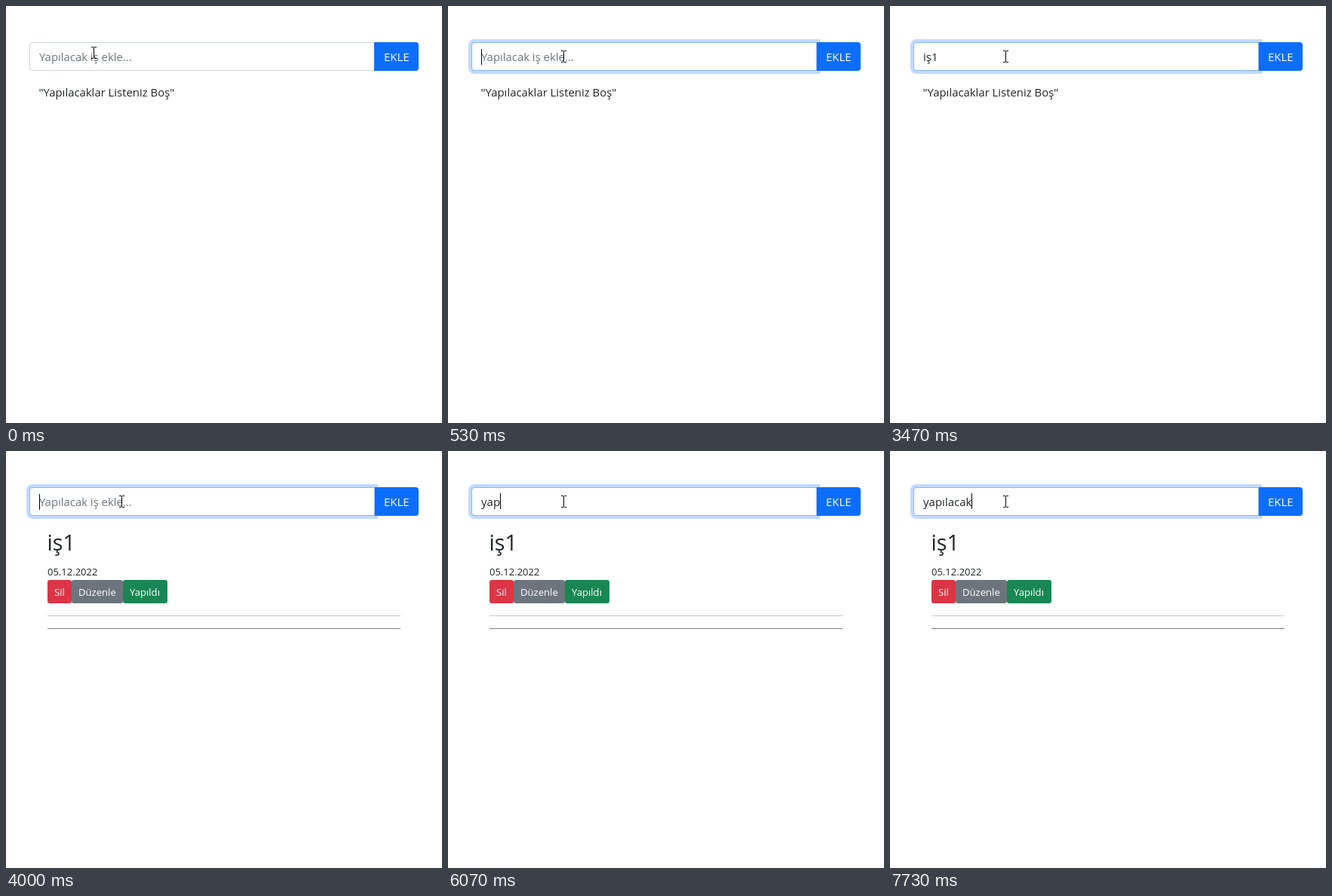
Write an HTML page that moves like this. It is 578x553 px and loops after 8000 ms.

```html
<!DOCTYPE html>
<html lang="tr">
<head>
<meta charset="utf-8">
<title>Yapılacaklar</title>
<style>
  html, body { margin: 0; width: 100%; height: 100%; overflow: hidden; background: #fff; }
  svg { display: block; width: 578px; height: 553px; }
  text { font: 15px "Open Sans", "Noto Sans", sans-serif; fill: #212529; white-space: pre; }
  .hint { fill: #6c757d; }
  .on { fill: #fff; }
  .tight { font-size: 14.9px; }
  .small { font-size: 13.1px; }
  .date { font-size: 13px; }
  .title { font-size: 28.75px; }
  .crisp { shape-rendering: crispEdges; }
</style>
</head>
<body>
<svg viewBox="0 0 578 553">
  <defs>
    <path id="field" d="M488.5 48.5H35a3.5 3.5 0 0 0-3.5 3.5V82a3.5 3.5 0 0 0 3.5 3.5H488.5z"/>
  </defs>
  <use href="#field" fill="#fff" stroke="#ced4da"/>
  <path fill="#0d6efd" d="M488 48H543a4 4 0 0 1 4 4V82a4 4 0 0 1-4 4H488z"/>
  <g id="focus">
    <use href="#field" fill="none" stroke="#0d6efd" stroke-opacity=".25" stroke-width="9"/>
    <use href="#field" fill="#fff" stroke="#86b7fe"/>
  </g>
  <text class="on tight" x="501" y="73">EKLE</text>

  <text id="hint" class="hint tight" x="44" y="73">Yapılacak iş ekle...</text>
  <text id="value" x="44" y="73"></text>
  <rect id="caret" class="crisp" width="1" height="21"/>

  <text id="empty" class="tight" x="43.5" y="120">"Yapılacaklar Listeniz Boş"</text>

  <g id="item">
    <text class="title" x="54.5" y="132">iş1</text>
    <text class="date" x="55" y="165">05.12.2022</text>
    <rect x="55" y="171" width="32" height="31" rx="3.2" fill="#dc3545"/>
    <rect x="87" y="171" width="68" height="31" rx="3.2" fill="#6c757d"/>
    <rect x="155" y="171" width="59" height="31" rx="3.2" fill="#198754"/>
    <text class="on small" x="64" y="192">Sil</text>
    <text class="on small" x="96" y="192">Düzenle</text>
    <text class="on small" x="164" y="192">Yapıldı</text>
    <rect class="crisp" x="55" y="218" width="468" height="1" fill="#c8c9ca"/>
    <rect class="crisp" x="55" y="235" width="468" height="1" fill="#7d8083"/>
  </g>

  <path id="pointer" class="crisp" d="M0 0h3v1h1v-1h3v1h-3v14h3v1h-3v-1h-1v1h-3v-1h3v-14h-3z"/>
</svg>
<script>
const LOOP = 8000, BLINK = 530;
const PRESS = 400, RELEASE = 530, SUBMIT = 4000;
const MOVE_STEP = 65, MOVE_STEPS = 3;

const words = [
  { text: "iş1", keys: [1600, 1730, 2930] },
  { text: "yapılacak", keys: [5600, 5730, 6070, 6270, 6530, 6670, 7330, 7400, 7730] }
];
// Every moment at which the caret restarts its blinking.
const inputs = [PRESS, RELEASE, SUBMIT, ...words.flatMap(word => word.keys)].sort((a, b) => a - b);

const $ = id => document.getElementById(id);
const show = (id, visible) => $(id).style.display = visible ? "" : "none";
const mix = (a, b, p) => Math.round(a + (b - a) * p);

function typedText(t) {
  const { text, keys } = words[t < SUBMIT ? 0 : 1];
  return text.slice(0, keys.filter(key => key <= t).length);
}

function caretVisible(t) {
  const last = inputs.findLast(time => time <= t);
  return last !== undefined && Math.floor((t - last) / BLINK) % 2 === 0;
}

function draw(t) {
  const text = typedText(t);
  const value = $("value"), caret = $("caret");
  if (value.textContent !== text) value.textContent = text;
  show("hint", !text);

  caret.setAttribute("x", Math.floor(44 + value.getComputedTextLength()));
  caret.setAttribute("y", text ? 56 : 57);
  show("caret", caretVisible(t));

  // The glow is half faded in while the button is held.
  $("focus").style.opacity = ((t >= PRESS) + (t >= RELEASE)) / 2;

  show("empty", t < SUBMIT);
  show("item", t >= SUBMIT);

  const p = Math.min(1, Math.floor(t / MOVE_STEP) / MOVE_STEPS);
  $("pointer").setAttribute("transform", `translate(${mix(113, 150, p)} ${mix(54, 59, p)})`);
}

const start = performance.now();
function tick() {
  draw((performance.now() - start) % LOOP);
  requestAnimationFrame(tick);
}
tick();
</script>
</body>
</html>
```
